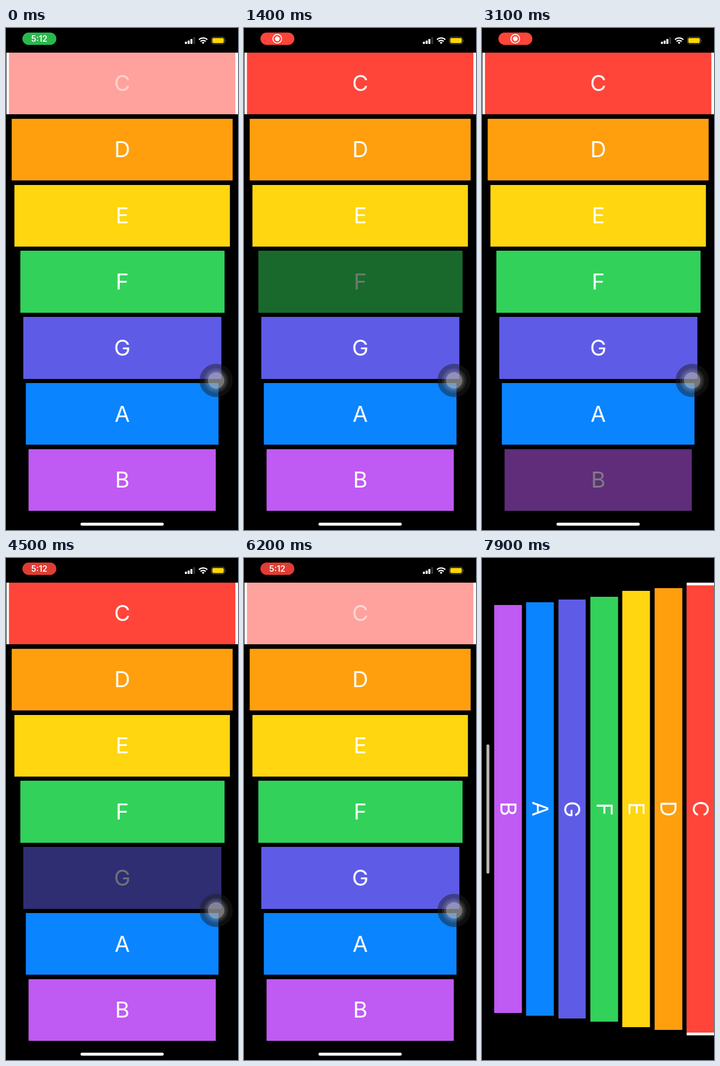
An HTML page that plays this animation: 509x1100 px, repeating every 8 s.

```html
<!DOCTYPE html>
<html lang="en">
<head>
<meta charset="utf-8">
<title>Xylophone</title>
<style>
  html, body { margin: 0; width: 100%; height: 100%; overflow: hidden; background: #000; }
  body { position: relative; font-family: Inter, Roboto, sans-serif; color: #fff; }
  body * { box-sizing: border-box; }

  /* Keyboard: turns to landscape while its layout reflows */
  #board {
    position: absolute; left: 254.5px; top: 550px;
    display: flex; flex-direction: column; gap: 9.6px;
    animation: turn 8s infinite;
  }
  @keyframes turn {
    0%, 91.375% {
      width: 509px; height: 1100px; padding: 54px 0 41.8px;
      transform: translate(-50%, -50%) rotate(0deg);
      animation-timing-function: ease-in-out;
    }
    96.375%, 100% {
      width: 1100px; height: 509px; padding: 0 54px 26px;
      transform: translate(-50%, -50%) rotate(90deg);
    }
  }
  .row { flex: 1 1 0; min-height: 0; padding: 0 var(--inset); }
  .row:first-child { background: #fff; }
  .key, .face { width: 100%; height: 100%; }
  .face {
    display: flex; align-items: center; justify-content: center;
    background: var(--color); font-size: 48.5px; line-height: 1;
  }
  .face b, .face i { font-weight: 400; font-style: normal; display: block; }

  /* Each key is struck once going up the scale and once coming down */
  .key, .face { animation: press 8s linear infinite; }
  .face b, .face i { animation: title 8s linear infinite; }
  .key, .face b { animation-delay: calc(var(--up) - 8s); }
  .face, .face i { animation-delay: calc(var(--down) - 8s); }
  .once .face, .once i { animation: none; }
  @keyframes press {
    0%, 2.5% { opacity: .5; }
    2.501%, 100% { opacity: 1; }
  }
  @keyframes title {
    0% { opacity: .5; }
    2%, 100% { opacity: 1; }
  }

  /* Status bar */
  svg { position: absolute; left: 0; top: 0; width: 509px; height: 1100px; }
  #status { animation: status 8s step-end infinite; }
  #pill { animation: pulse 1.7s -.3s ease-in-out infinite, tint 8s step-end infinite; }
  #pill { animation-delay: -.3s, 0s; }
  #time { animation: time 8s step-end infinite; }
  #rec { animation: rec 8s step-end infinite; }
  @keyframes status { 0% { opacity: 1; } 91.4%, 100% { opacity: 0; } }
  @keyframes pulse { 0%, 100% { fill-opacity: 1; } 50% { fill-opacity: .55; } }
  @keyframes tint { 0% { fill: #30d158; } 7.5%, 100% { fill: #ff453a; } }
  @keyframes time { 0% { opacity: 1; } 7.5% { opacity: 0; } 47.5%, 100% { opacity: 1; } }
  @keyframes rec { 0% { opacity: 0; } 7.5% { opacity: 1; } 47.5%, 100% { opacity: 0; } }

  /* Home indicators and floating button */
  #homeTall { animation: leave 8s linear infinite; }
  #homeWide { animation: enter 8s linear infinite; }
  #touch { animation: hide 8s linear infinite; }
  @keyframes leave { 0%, 91.375% { opacity: 1; } 93%, 100% { opacity: 0; } }
  @keyframes enter { 0%, 96.4% { opacity: 0; } 99.7%, 100% { opacity: 1; } }
  @keyframes hide { 0%, 93.2% { opacity: 1; } 95.5%, 100% { opacity: 0; } }
</style>
</head>
<body>
<div id="board"></div>

<svg viewBox="0 0 509 1100">
  <g id="status">
    <rect id="pill" x="36" y="10" width="74.5" height="27" rx="13.5"/>
    <text id="time" x="73" y="30" text-anchor="middle" font-size="18" font-weight="600" fill="#fff">5:12</text>
    <g id="rec">
      <circle cx="73" cy="23.5" r="9.6" fill="none" stroke="#fff" stroke-width="2"/>
      <circle cx="73" cy="23.5" r="5.2" fill="#fff"/>
    </g>
    <g fill="#fff">
      <rect x="392.5" y="30" width="4.4" height="5" rx="1.2"/>
      <rect x="398.5" y="27.5" width="4.4" height="7.5" rx="1.2"/>
      <rect x="404.5" y="24" width="4.4" height="11" rx="1.2"/>
      <rect x="410.5" y="20" width="4.4" height="15" rx="1.2" fill="#333"/>
    </g>
    <g fill="none" stroke="#fff" stroke-width="2.9">
      <path d="M423.4 25.6a13 13 0 0 1 18.2 0"/>
      <path d="M426.8 29.4a8.2 8.2 0 0 1 11.4 0"/>
      <path d="M432.5 35l-3-3.1a4.3 4.3 0 0 1 6 0z" fill="#fff" stroke="none"/>
    </g>
    <rect x="450.7" y="20.2" width="29" height="14.6" rx="4.4" fill="none" stroke="#666" stroke-width="1.3"/>
    <rect x="452.6" y="22.1" width="25.2" height="10.8" rx="2.8" fill="#ffd60a"/>
    <path d="M481 25.2q2 2.3 0 4.6z" fill="#666"/>
  </g>
  <rect id="homeTall" x="163.5" y="1084" width="182.5" height="6.5" rx="3.25" fill="#fff"/>
  <rect id="homeWide" x="9.8" y="408.5" width="6.4" height="283" rx="3.2" fill="#fff"/>
  <g id="touch" fill="#fff">
    <circle cx="461" cy="772.3" r="36.5" fill="#1e1e20" fill-opacity=".48"/>
    <circle cx="461" cy="772.3" r="27" fill-opacity=".08"/>
    <circle cx="461" cy="772.3" r="22.5" fill-opacity=".11"/>
    <circle cx="461" cy="772.3" r="18" fill-opacity=".3"/>
  </g>
</svg>

<script>
  // note, colour, side inset, strike times in seconds
  const keys = [
    ['C', '#ff453a', 6.1, 0, 6.18],
    ['D', '#ff9f0e', 12.2, .43, 5.75],
    ['E', '#ffd60f', 18.3, .87, 5.3],
    ['F', '#32d25a', 30.5, 1.3, 4.85],
    ['G', '#5e5ce6', 36.7, 1.85, 4.4],
    ['A', '#0a84ff', 42.8, 2.4, 3.7],
    ['B', '#bf5af2', 48.9, 2.95]
  ];
  document.getElementById('board').innerHTML = keys.map(([note, color, inset, up, down]) =>
    `<div class="row${down ? '' : ' once'}"
      style="--color:${color};--inset:${inset}px;--up:${up}s;--down:${down || 0}s">
      <div class="key"><div class="face"><b><i>${note}</i></b></div></div>
    </div>`).join('');
</script>
</body>
</html>
```
